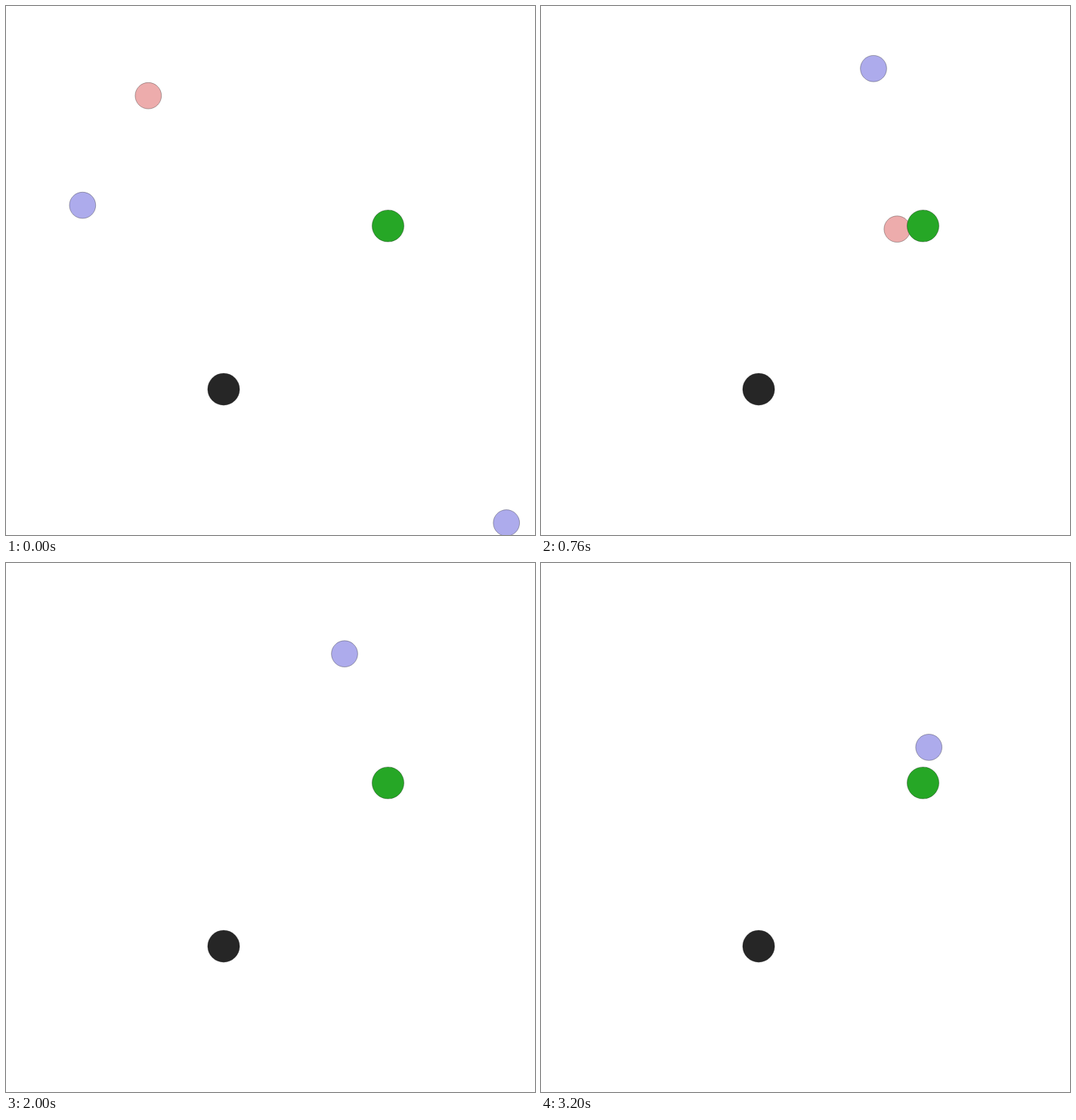
These frames come from a looping animation (700x700 px, 3240 ms). An HTML page:

```html
<!DOCTYPE html>
<html lang="en">
<head>
<meta charset="utf-8">
<title>Drifting particles</title>
<style>
  html, body { margin: 0; width: 100%; height: 100%; overflow: hidden; background: #fff; }
  svg { display: block; width: 100vw; height: 100vh; }
  circle { stroke: #000; stroke-opacity: .5; stroke-width: .6; }
  .red { fill: #edacac; }
  .blue { fill: #adabec; }
  .green { fill: #26a726; }
  .black { fill: #262626; }
</style>
</head>
<body>
<svg viewBox="0 0 700 700">
  <g id="movers"></g>
  <circle class="green" cx="505.5" cy="291" r="21.1"/>
  <circle class="black" cx="288" cy="507.1" r="21.1"/>
</svg>
<script>
const LOOP = 3240, STEP = 40;

// A few key points per particle: [ms, x, y]
const particles = [
  { kind: 'red', path: [
    [0, 188.3, 118.7], [440, 247.3, 204.8], [760, 471.3, 295.2], [1120, 705, 348], [1240, 775, 348]
  ] },
  { kind: 'blue', path: [[0, 101.3, 263.7], [300, -20, 265]] },
  { kind: 'blue', path: [
    [0, 662.2, 684], [440, 481.4, 272], [760, 440, 82.8], [1000, 441, 66],
    [1400, 444.8, 92.9], [2000, 448, 120.2], [2640, 481, 166.8], [3200, 513.2, 243.9]
  ] }
];

// Slope at point i, weighted by the neighbouring intervals.
function slope(path, i, axis) {
  const rate = k => (path[k + 1][axis] - path[k][axis]) / (path[k + 1][0] - path[k][0]);
  if (i === 0) return rate(0);
  if (i === path.length - 1) return rate(i - 1);
  const before = path[i][0] - path[i - 1][0];
  const after = path[i + 1][0] - path[i][0];
  return (rate(i - 1) * after + rate(i) * before) / (before + after);
}

// Cubic Hermite curve through the points.
function at(path, t, axis) {
  const last = path.length - 1;
  if (t >= path[last][0]) return path[last][axis];
  let i = 0;
  while (t >= path[i + 1][0]) i++;
  const h = path[i + 1][0] - path[i][0];
  const u = (t - path[i][0]) / h;
  const v = 1 - u;
  return path[i][axis] * (1 + 2 * u) * v * v
    + path[i + 1][axis] * u * u * (3 - 2 * u)
    + h * u * v * (slope(path, i, axis) * v - slope(path, i + 1, axis) * u);
}

const movers = document.getElementById('movers');
for (const p of particles) {
  p.dot = document.createElementNS(movers.namespaceURI, 'circle');
  p.dot.setAttribute('class', p.kind);
  p.dot.setAttribute('r', 17.4);
  movers.append(p.dot);
}

function draw(ms) {
  const t = Math.floor((ms % LOOP) / STEP) * STEP;
  for (const { dot, path } of particles) {
    dot.setAttribute('cx', at(path, t, 1));
    dot.setAttribute('cy', at(path, t, 2));
  }
}

const start = performance.now();
function tick() {
  draw(performance.now() - start);
  requestAnimationFrame(tick);
}
tick();
</script>
</body>
</html>
```
